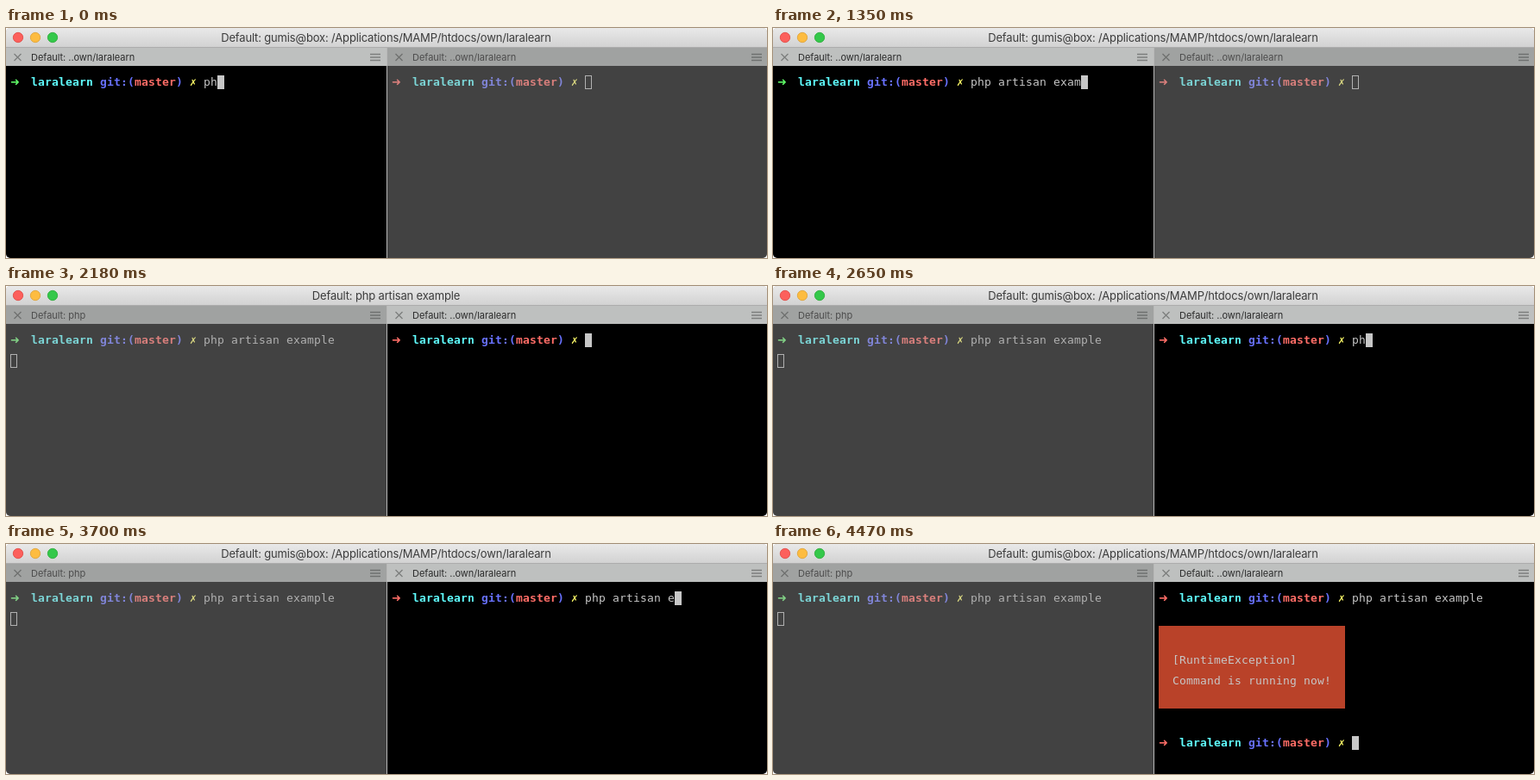
Recreate the animation shown at these times as an HTML page. Size 882 by 267 pixels, loop 6940 ms.

```html
<!DOCTYPE html>
<html lang="en">
<head>
<meta charset="utf-8">
<title>Terminal</title>
<style>
html, body { margin: 0; width: 100%; height: 100%; overflow: hidden; background: #fff; }
svg { display: block; width: 100%; height: 100%; }
text { white-space: pre; }
.title { font: 13px Inter, sans-serif; letter-spacing: -.16px; fill: #3c3c3c; text-anchor: middle; }
.tab { font: 11px Inter, sans-serif; letter-spacing: -.04px; fill: var(--label); }
.mono { font: 13px "DejaVu Sans Mono", monospace; letter-spacing: .174px; fill: var(--text); }
.bold { font-weight: bold; }
.sign { font: bold 13px "DejaVu Sans", sans-serif; }
.pane {
  --bg: #000; --bar: #bec0bf; --label: #2b2b2b; --icon: #7c7e7d; --text: #c7c7c7;
  --green: #5ff967; --red: #ff6d67; --cyan: #5ffdff; --blue: #6871ff; --yellow: #fefb67;
}
.pane.dim {
  --bg: #424242; --bar: #a0a2a1; --label: #4c4c4c; --icon: #6e706f; --text: #b1b1b1;
  --green: #81d085; --red: #d97f7c; --cyan: #7cd6d7; --blue: #8085d8; --yellow: #d9d780;
}
</style>
</head>
<body>
<svg id="stage" viewBox="0 0 882 267" xmlns="http://www.w3.org/2000/svg">
  <defs>
    <linearGradient id="chrome" x2="0" y2="1">
      <stop stop-color="#e9e9e9"/><stop offset="1" stop-color="#d2d2d2"/>
    </linearGradient>
    <clipPath id="frame"><rect width="882" height="267" rx="5"/></clipPath>
  </defs>
  <g id="win" clip-path="url(#frame)">
    <rect width="882" height="267" fill="#b9b9b9"/>
    <rect width="882" height="22" fill="url(#chrome)"/>
    <rect y="22" width="882" height="1" fill="#acacac"/>
    <g stroke-width=".8">
      <circle cx="14" cy="11" r="5.7" fill="#fc605c" stroke="#e0443f"/>
      <circle cx="34" cy="11" r="5.7" fill="#fdbc40" stroke="#dea034"/>
      <circle cx="54" cy="11" r="5.7" fill="#34c84a" stroke="#27aa35"/>
    </g>
  </g>
</svg>
<script>
const LOOP = 6940;
const COMMAND = "php artisan example";
const HOST_TITLE = "Default: gumis@box: /Applications/MAMP/htdocs/own/laralearn";
const RUN_TITLE = "Default: " + COMMAND;
const IDLE_TAB = "Default: ..own/laralearn";
const CELL = 8, ROW = 24;

// Typing bursts: start, end, steps, characters before, characters after
const LEFT_KEYS = [[60, 230, 3, 2, 5], [470, 1120, 8, 5, 13], [1290, 1350, 2, 13, 16], [1530, 1700, 3, 16, 19]];
const RIGHT_KEYS = [[2530, 2880, 5, 0, 5], [3060, 3700, 7, 5, 13], [3820, 3880, 2, 13, 16], [4060, 4180, 3, 16, 19]];

const win = document.getElementById("win");

function add(parent, tag, attrs, content = "") {
  const node = document.createElementNS("http://www.w3.org/2000/svg", tag);
  for (const key in attrs) node.setAttribute(key, attrs[key]);
  node.textContent = content;
  parent.append(node);
  return node;
}

const baseline = row => 67 + row * ROW;

function addPrompt(parent, row, arrow) {
  const group = add(parent, "g", {});
  const put = (col, cls, color, content) => add(group, "text", {
    x: 5 + col * CELL, y: baseline(row), class: cls, style: `fill: var(--${color})`
  }, content);
  put(0, "sign", arrow, "➜");
  put(3, "mono bold", "cyan", "laralearn");
  put(13, "mono bold", "blue", "git:(");
  put(18, "mono bold", "red", "master");
  put(24, "mono bold", "blue", ")");
  put(26, "mono bold", "yellow", "✗");
  return group;
}

function addPane(x, width, arrow) {
  const root = add(win, "g", { transform: `translate(${x})` });
  add(root, "rect", { y: 23, width, height: 21, fill: "var(--bar)" });
  add(root, "rect", { y: 44, width, height: 223, fill: "var(--bg)" });
  add(root, "path", { d: "M9.5 30l8 8m0-8l-8 8", stroke: "var(--icon)", "stroke-width": 1.3 });
  add(root, "path", { d: "M422 30.5h12m-12 3.5h12m-12 3.5h12", stroke: "var(--icon)", "stroke-width": 1.4 });
  const tab = add(root, "text", { x: 29, y: 38, class: "tab" });
  addPrompt(root, 0, arrow);
  const input = add(root, "text", { x: 229, y: baseline(0), class: "mono" });
  const cursor = add(root, "rect", {});
  return { root, tab, input, cursor };
}

const title = add(win, "text", { x: 440.5, y: 16, class: "title" });
const left = addPane(0, 441, "green");
const right = addPane(442, 440, "red");

const output = add(right.root, "g", {});
add(output, "rect", { x: 5, y: 95, width: 27 * CELL, height: 4 * ROW, fill: "#b94229" });
add(output, "text", { x: 21, y: baseline(3), class: "mono" }, "[RuntimeException]");
add(output, "text", { x: 21, y: baseline(4), class: "mono" }, "Command is running now!");
addPrompt(output, 7, "red");

function typed(t, bursts) {
  let count = bursts[0][3];
  for (const [start, end, steps, before, after] of bursts) {
    if (t < start) break;
    const step = Math.min(steps, 1 + Math.floor((t - start) / (end - start) * (steps - 1) + 1e-6));
    count = Math.round(before + (after - before) * step / steps);
  }
  return count;
}

function updatePane(pane, active, tab, count, col, row) {
  pane.root.setAttribute("class", active ? "pane" : "pane dim");
  pane.tab.textContent = tab;
  pane.input.textContent = COMMAND.slice(0, count);
  const inset = active ? 0 : .5;
  const box = {
    x: 5 + col * CELL + inset, y: 55 + row * ROW + inset,
    width: CELL - 2 * inset, height: 16 - 2 * inset,
    fill: active ? "var(--text)" : "none", stroke: active ? "none" : "var(--text)"
  };
  for (const key in box) pane.cursor.setAttribute(key, box[key]);
}

function render(t) {
  const onLeft = t < 2180;
  const leftRunning = t >= 1940;
  const rightRunning = t >= 4350 && t < 4470;
  const done = t >= 4470;

  title.textContent = (leftRunning && t < 2230) || rightRunning ? RUN_TITLE : HOST_TITLE;

  const leftCount = typed(t, LEFT_KEYS);
  const leftSent = t >= 1880;
  updatePane(left, onLeft, leftRunning ? "Default: php" : IDLE_TAB,
    leftCount, leftSent ? 0 : 28 + leftCount, leftSent ? 1 : 0);

  const rightCount = typed(t, RIGHT_KEYS);
  const rightSent = t >= 4290;
  const col = done ? 28 : rightSent ? 0 : 28 + rightCount;
  updatePane(right, !onLeft, rightRunning ? "Default: php" : IDLE_TAB,
    rightCount, col, done ? 7 : rightSent ? 1 : 0);
  output.setAttribute("visibility", done ? "visible" : "hidden");
}

const origin = performance.now();
function tick() {
  render((performance.now() - origin) % LOOP);
  requestAnimationFrame(tick);
}
tick();
</script>
</body>
</html>
```
